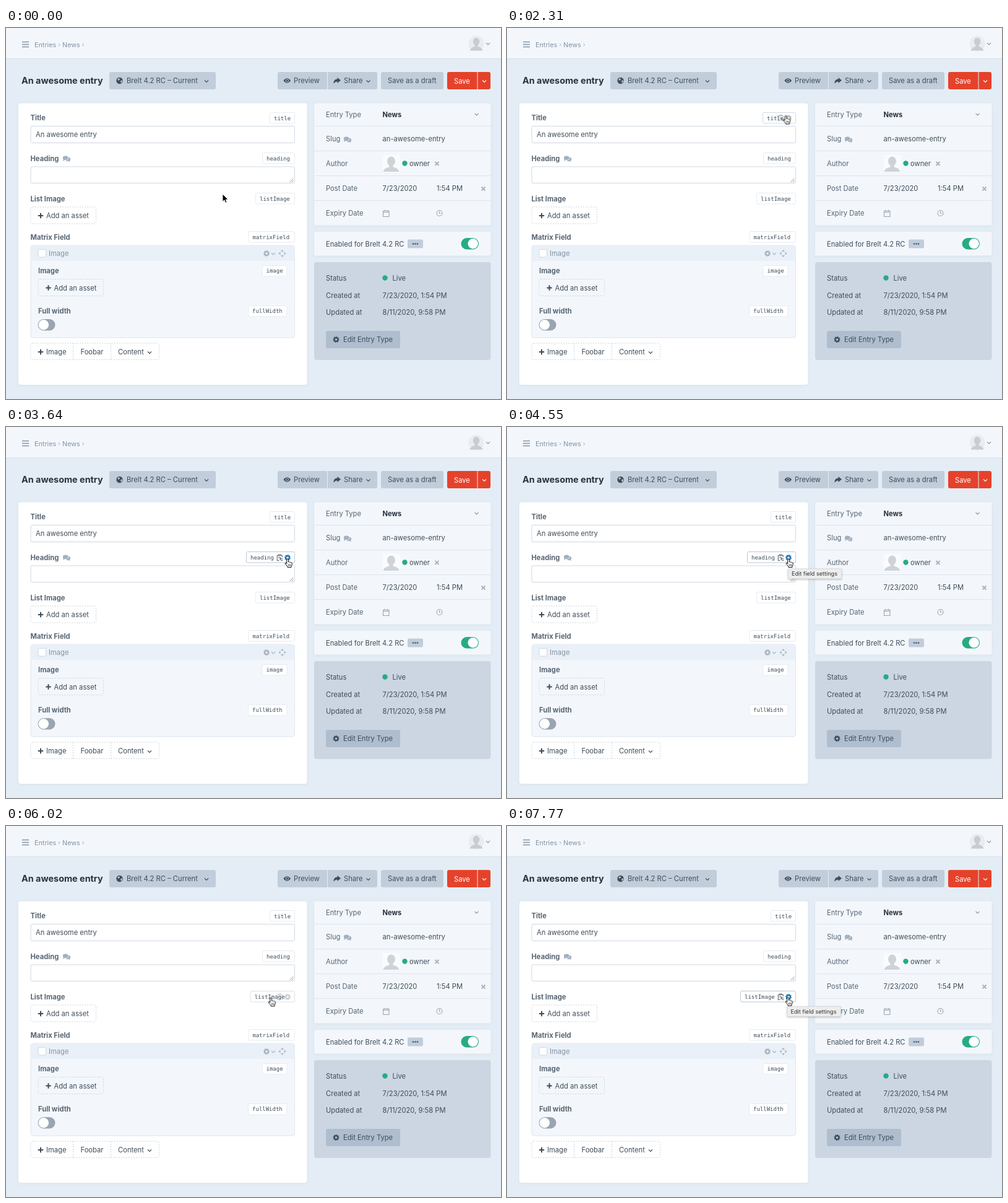
Recreate the animation shown at these times as an HTML page. Size 800 px wide and 599 px high, loop 8000 ms.

```html
<!DOCTYPE html>
<html lang="en">
<head>
<meta charset="utf-8">
<title>Entry editor</title>
<style>
@property --open { syntax: "<number>"; inherits: true; initial-value: 0; }
html, body { margin: 0; width: 100%; height: 100%; overflow: hidden; background: #e4edf5; }
svg { display: block; }
#stage { width: 100%; height: 100%; }
text { font: 11.2px Inter, "Open Sans", sans-serif; fill: #3f4d5a; }
.h1 { font-size: 14.4px; font-weight: 700; fill: #29323d; }
.label text, .bold { font-weight: 700; }
.label text { fill: #596673; }
.meta text { fill: #566473; }
.crumb { fill: #8494a6; font-size: 10.8px; }
.white { fill: #fff; }
.btn { fill: #c1cddb; }
.dash { fill: #fff; stroke: #cbd5df; stroke-dasharray: 2 2; }
.input { fill: #fff; stroke: #cfd9e4; }
.pane { fill: #f3f7fc; }
.rule { stroke: #dce5ee; fill: none; }
.line { fill: none; stroke: currentColor; stroke-width: 1.1; }
.shadow { filter: drop-shadow(0 1px 2px #cdd8e480); }

/* field handles: --x is the closed left edge, --open widens it to the left */
.handle rect {
  x: calc(var(--x) - 26px * var(--open));
  width: calc(var(--end, 466.5px) - var(--x) + 26px * var(--open));
  height: 17.5px;
  fill: #fff;
  stroke: color-mix(in srgb, #bcc8d4 calc(100% * var(--open)), #e6ebf1);
}
.handle text {
  font: 9px "DejaVu Sans Mono", monospace;
  fill: #3f4d5a;
  transform: translateX(calc(var(--x) + 6.5px - 26px * var(--open)));
}
.handle .tools { opacity: var(--open); color: #596673; }

.title { animation: open-title 8s linear infinite; }
.heading { animation: open-heading 8s linear infinite; }
.list { animation: open-list 8s linear infinite; }
@keyframes open-title { 0%, 27.4%, 36.4%, 100% { --open: 0 } 30.4%, 33.4% { --open: 1 } }
@keyframes open-heading { 0%, 38.7%, 73%, 100% { --open: 0 } 41.7%, 70% { --open: 1 } }
@keyframes open-list { 0%, 74.3% { --open: 0 } 77.3%, 100% { --open: 1 } }

.heading .gear { animation: hot-heading 8s step-end infinite; }
.list .gear { animation: hot-list 8s step-end infinite; }
@keyframes hot-heading { 0%, 70% { color: #596673 } 39.5% { color: #1c73b1 } }
@keyframes hot-list { 0% { color: #596673 } 87.3%, 100% { color: #1c73b1 } }

#pointer { animation: move 8s linear infinite; }
@keyframes move {
  0%, 8% { transform: translate(350px, 268px) }
  14.9% { transform: translate(355px, 226px) }
  20% { transform: translate(390px, 185px) }
  28.5%, 32% { transform: translate(450.5px, 141.5px) }
  40%, 69.5% { transform: translate(455px, 213px) }
  75.5%, 84% { transform: translate(427px, 280px) }
  88%, 100% { transform: translate(454px, 276.5px) }
}
#arrow { animation: arrow 8s step-end infinite; }
#beam { animation: beam 8s step-end infinite; }
#hand { animation: hand 8s step-end infinite; }
@keyframes arrow {
  0%, 15.2%, 25%, 33.4%, 37%, 70%, 72.8% { opacity: 1 }
  11%, 19.9%, 27%, 33.8%, 38.7%, 70.5%, 74.3%, 100% { opacity: 0 }
}
@keyframes beam {
  0%, 15.2%, 25%, 37%, 72.8%, 100% { opacity: 0 }
  11%, 19.9%, 33.8%, 70.5% { opacity: 1 }
}
@keyframes hand {
  0%, 33.4%, 70% { opacity: 0 }
  27%, 38.7%, 74.3%, 100% { opacity: 1 }
}

.tip { filter: drop-shadow(0 1px 1.5px #0004); }
.tip rect { width: 86px; height: 16px; fill: #ededee; stroke: #d2d5d8; stroke-width: .6; }
.tip text { font-size: 9.1px; fill: #333; }
#settings { animation: settings 8s step-end infinite; }
#copy { animation: copy 8s step-end infinite; }
@keyframes settings {
  0%, 69.5% { opacity: 0; transform: translate(454.5px, 229px) }
  56% { opacity: 1; transform: translate(454.5px, 229px) }
  95%, 100% { opacity: 1; transform: translate(453px, 291.5px) }
}
@keyframes copy { 0%, 84%, 100% { opacity: 0 } 80% { opacity: 1 } }
</style>
</head>
<body>
<svg id="stage" viewBox="0 0 800 599">
  <defs>
    <g id="gear" fill="none" stroke="currentColor">
      <circle r="2.9" stroke-width="2.2"/>
      <circle r="4.2" stroke-width="1.7" pathLength="16" stroke-dasharray="1"/>
    </g>
    <path id="down" class="line" d="M-3-1.5 0 1.5 3-1.5"/>
    <path id="plus" d="M-4.2 0h8.4M0-4.2v8.4" stroke="#3f4d5a" stroke-width="2"/>
    <path id="cross" d="M-3-3 3 3M3-3-3 3" stroke="#a9b4c0" stroke-width="2"/>
    <g id="chat" fill="#a3b1c0">
      <ellipse cx="-1.8" cy="-1.2" rx="4.4" ry="3.2"/>
      <path d="M-5 0-6 4-2 1.5M3.2-2.5C7-1.5 7 2 5 3L6 5 3 4Q0 4.5-2 3 4 2 3.2-2.5"/>
    </g>
    <g id="person">
      <ellipse cy="-3" rx="5.2" ry="6.3"/>
      <path d="M-2.5 2h5v3q7 1.5 8 6.5H-10.5q1-5 8-6.5z"/>
    </g>
    <g id="clip" class="line" stroke-width="1">
      <path d="M-1 4.5H-4.2V-3.5H3.8V-1M-2-3.5V-5H1.6V-3.5M-2.5-.8H1M5 1.8H0M2-.2 0 1.8 2 3.8M2 4.5H4V3.5"/>
    </g>
    <g id="tools" class="tools">
      <use href="#clip" x="442.5"/>
      <g class="gear"><use href="#gear" x="455"/></g>
    </g>
  </defs>

  <rect width="800" height="599" fill="#e4edf5"/>
  <rect class="pane" width="800" height="49"/>
  <path d="M0 49.5h800" stroke="#d7e1ea"/>
  <path d="M26 22.5h11M26 26.5h11M26 30.5h11" stroke="#8494a6" stroke-width="1.6"/>
  <text class="crumb" x="46" y="31">Entries</text>
  <text class="crumb" x="91" y="31">News</text>
  <path d="M85 25l2 2.200-2 2.200M123.500 25l2 2.200-2 2.200" stroke="#9aa7b5" fill="none"/>
  <circle cx="760" cy="25" r="12.5" fill="#e9ecf0"/>
  <use href="#person" x="760" y="25" fill="#c8cdd3"/>
  <use href="#down" x="779" y="25.5" color="#8b99a8"/>

  <text class="h1" x="25" y="90">An awesome entry</text>
  <g class="btn">
    <rect x="167" y="71" width="172" height="28" rx="3"/>
    <path d="M442 71H519V99H442q-3 0-3-3V74q0-3 3-3M520 71h77q3 0 3 3v22q0 3-3 3h-77z"/>
    <rect x="606" y="71" width="101" height="28" rx="3"/>
  </g>
  <g color="#3f4d5a">
    <circle cx="183.500" cy="85" r="5.200" fill="currentColor"/>
    <path d="M180 83l3-2 1 2-2 2zM185 86l2-2 1 2-2 3z" fill="#c1cddb"/>
    <use href="#down" x="324" y="86"/>
    <path d="M448.500 85q5.500-7.500 11.500 0-6 7.500-11.500 0" fill="currentColor"/>
    <circle cx="454.300" cy="85" r="2.200" fill="none" stroke="#c1cddb"/>
    <path d="M529.500 90q-.5-7.500 6-7.500v-2.500l5.500 4.500-5.500 4.500v-2.500q-4 0-6 3.500" fill="currentColor"/>
    <use href="#down" x="585.500" y="86"/>
  </g>
  <text x="195" y="89">Brelt 4.2 RC – Current</text>
  <text x="465" y="89">Preview</text>
  <text x="546" y="89">Share</text>
  <text x="617" y="89">Save as a draft</text>
  <path d="M716 71h45.500v28H716q-3 0-3-3V74q0-3 3-3M762.500 71H780q3 0 3 3v22q0 3-3 3h-17.500z" fill="#e5422b"/>
  <text class="white" x="724" y="89.500">Save</text>
  <use href="#down" x="773" y="86" color="#fff"/>

  <rect class="shadow" x="20" y="121.500" width="466.500" height="454.500" rx="4" fill="#fff"/>
  <g class="label">
    <text x="39.500" y="149">Title</text>
    <text x="39.500" y="214.500">Heading</text>
    <text x="39.500" y="279.500">List Image</text>
    <text x="39.500" y="341.500">Matrix Field</text>
  </g>
  <use href="#chat" x="98" y="211"/>
  <rect class="input" x="40" y="158.500" width="426.500" height="27" rx="2"/>
  <text x="48" y="176">An awesome entry</text>
  <rect class="input" x="40" y="224" width="426.500" height="26.500" rx="2"/>
  <path d="M458.500 249l6-6M462 249l2.500-2.500" stroke="#7d8790" stroke-width=".9"/>
  <rect class="dash" x="40" y="289" width="105.500" height="27" rx="3"/>
  <use href="#plus" x="56" y="303"/>
  <text x="65" y="307">Add an asset</text>

  <rect x="40" y="351" width="426.500" height="149" rx="4" fill="#f3f7fc" stroke="#dce5ee"/>
  <path d="M40.500 376V354q0-3 3-3h420q3 0 3 3v22z" fill="#e9f0f8"/>
  <rect x="52" y="357.500" width="12.500" height="12.500" rx="2" class="input"/>
  <text x="69" y="367.500" style="fill:#8592a0">Image</text>
  <g color="#a8b4c1">
    <use href="#gear" x="421" y="364"/>
    <use href="#down" x="432" y="364.500"/>
    <path d="M446.500 358l2.500 3h-5zM446.500 370l2.500-3h-5zM440.500 364l3-2.500v5zM452.500 364l-3-2.500v5z" fill="currentColor"/>
  </g>
  <g class="label">
    <text x="52" y="396">Image</text>
    <text x="52" y="461">Full width</text>
  </g>
  <rect class="dash" style="fill:none" x="52" y="405.500" width="105.500" height="27" rx="3"/>
  <use href="#plus" x="68.500" y="419.500"/>
  <text x="77.500" y="423.500">Add an asset</text>
  <rect x="51.500" y="470" width="28" height="18.500" rx="9.250" fill="#9aa5b1"/>
  <circle cx="60.800" cy="479.250" r="8.300" fill="#fff"/>
  <rect class="dash" x="40" y="509" width="207.500" height="26.500" rx="3"/>
  <path class="dash" d="M108.500 509v26.500M169.500 509v26.500"/>
  <use href="#plus" x="56" y="523"/>
  <text x="65" y="527">Image</text>
  <text x="120.500" y="527">Foobar</text>
  <text x="181" y="527">Content</text>
  <use href="#down" x="232" y="524" color="#3f4d5a"/>

  <g class="handle title" style="--x:426.500px"><rect y="136.500" rx="2"/><text y="148.500">title</text><g class="tools" transform="translate(0 145.500)"><use href="#clip" x="442.500"/><use href="#gear" x="455"/></g></g>
  <g class="handle heading" style="--x:414.500px"><rect y="201.500" rx="2"/><text y="213.500">heading</text><g class="tools" transform="translate(0 211)"><use href="#clip" x="442.500"/><g class="gear"><use href="#gear" x="455"/></g></g></g>
  <g class="handle list" style="--x:403.500px"><rect y="266.500" rx="2"/><text y="278.500">listImage</text><g class="tools" transform="translate(0 276)"><use href="#clip" x="442.500"/><g class="gear"><use href="#gear" x="455"/></g></g></g>
  <g class="handle" style="--x:392px"><rect y="328.500" rx="2"/><text y="340.500">matrixField</text></g>
  <g class="handle" style="--x:414px;--end:454px"><rect y="383.500" rx="2"/><text y="395">image</text></g>
  <g class="handle" style="--x:391.500px;--end:454px"><rect y="448.500" rx="2"/><text y="460">fullWidth</text></g>

  <g class="pane shadow">
    <rect x="498" y="121.500" width="285.500" height="197" rx="3"/>
    <rect x="498" y="329" width="285.500" height="38.500" rx="3"/>
  </g>
  <path class="rule" d="M498 158.500h285.500M498 198.500h285.500M498 238.500h285.500M498 278.500h285.500"/>
  <g class="meta">
    <text x="517" y="144">Entry Type</text>
    <text x="517" y="183">Slug</text>
    <text x="517" y="222.500">Author</text>
    <text x="517" y="262.500">Post Date</text>
    <text x="517" y="302.500">Expiry Date</text>
  </g>
  <text class="bold" x="608.500" y="144" style="fill:#29323d">News</text>
  <use href="#down" x="760.500" y="139.500" color="#8b99a8"/>
  <use href="#chat" x="552" y="180"/>
  <text x="608.500" y="183">an-awesome-entry</text>
  <rect x="608.500" y="204.500" width="28.500" height="28" fill="#fafbfc"/>
  <use href="#person" transform="translate(622.500 218.500) scale(1.250 1.180)" fill="#cfd3d8"/>
  <circle cx="644.500" cy="218.500" r="4.200" fill="#27ab83"/>
  <text x="652" y="222.500">owner</text>
  <use href="#cross" x="696.500" y="219"/>
  <text x="608.500" y="262.500">7/23/2020</text>
  <text x="696" y="262.500">1:54 PM</text>
  <use href="#cross" x="771.500" y="259.500"/>
  <g color="#9aa5b1">
    <path class="line" d="M609.500 295.500h9.500v9h-9.500zM609.500 297.500h9.500M612 293.500v2M616.500 293.500v2"/>
    <circle class="line" cx="700.500" cy="299" r="4.500"/>
    <path class="line" d="M700.500 296v3.200h2"/>
  </g>

  <text x="517" y="352.500">Enabled for Brelt 4.2 RC</text>
  <rect class="btn" x="649" y="341.500" width="25" height="14" rx="2"/>
  <g fill="#4a5968"><circle cx="658" cy="348.500" r="1.300"/><circle cx="661.500" cy="348.500" r="1.300"/><circle cx="665" cy="348.500" r="1.300"/></g>
  <rect x="735.500" y="339" width="28.500" height="18.500" rx="9.250" fill="#27ab83"/>
  <circle cx="754.700" cy="348.250" r="8.300" fill="#fff"/>

  <rect x="498" y="378" width="285.500" height="158" rx="4" fill="#cbd6e2"/>
  <text x="517" y="407.500">Status</text>
  <text x="517" y="435.500">Created at</text>
  <text x="517" y="463">Updated at</text>
  <circle cx="612.500" cy="403.500" r="4.200" fill="#27ab83"/>
  <text x="624.500" y="407.500">Live</text>
  <text x="608.500" y="435.500">7/23/2020, 1:54 PM</text>
  <text x="608.500" y="463">8/11/2020, 9:58 PM</text>
  <rect x="517" y="489" width="120" height="28" rx="3" fill="#afbece"/>
  <use href="#gear" x="533.500" y="503" color="#3f4d5a"/>
  <text x="545" y="507">Edit Entry Type</text>

  <g id="settings" class="tip"><rect/><text x="5.500" y="11.200">Edit field settings</text></g>
  <g transform="translate(426.500 295)"><g id="copy" class="tip"><rect/><text x="5" y="11.200">Copy to clipboard</text></g></g>

  <g id="pointer">
    <path id="arrow" d="M0 0V12.500L2.900 9.800 4.900 14.300 7 13.400 5.100 9H9z" stroke="#fff" stroke-width=".9"/>
    <g id="beam" fill="none">
      <path d="M-2.800-6Q0-6 0-4.500 0-6 2.800-6M0-4.500V4.500M-2.800 6Q0 6 0 4.500 0 6 2.800 6" stroke="#fff" stroke-width="2.600"/>
      <path d="M-2.800-6Q0-6 0-4.500 0-6 2.800-6M0-4.500V4.500M-2.800 6Q0 6 0 4.500 0 6 2.800 6M-1.500 1.500h3" stroke="#222" stroke-width="1.200"/>
    </g>
    <g id="hand" stroke="#111" stroke-linejoin="round">
      <path d="M-1.300 8V1.200Q-1.200 0 0 0T1.300 1.200V5Q2.800 4 3.600 5.400 5 4.700 5.600 6 7.300 5.600 7.300 7.500 7.400 10 6 11.500V13.600H0V12.200L-3.700 8Q-4.300 6.600-3 6.300-2 6.300-1.300 8z" fill="#fff"/>
      <path d="M1.300 8.500v3M3 8.500v3M4.700 8.500v3" stroke-width=".7"/>
    </g>
  </g>
</svg>
</body>
</html>
```
